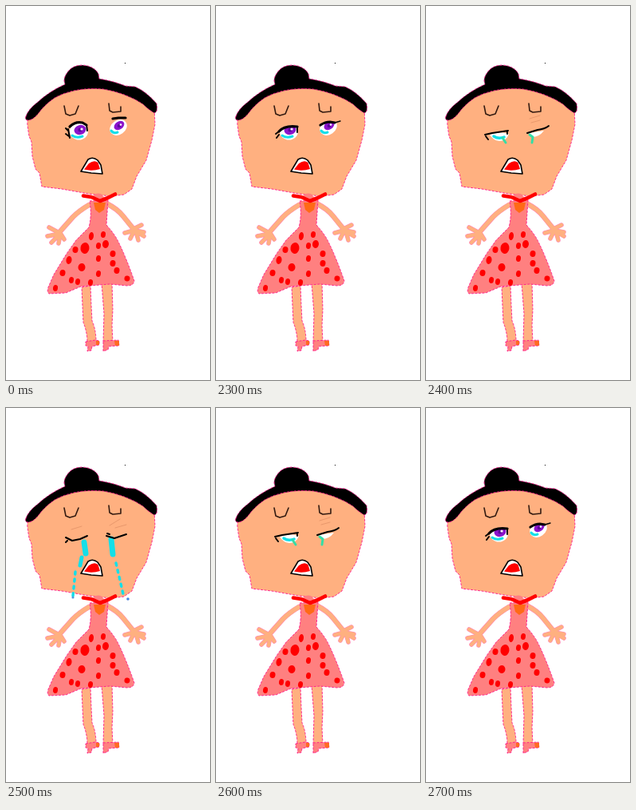
Write an HTML page that moves like this. It is 256 px wide and 468 px high and loops after 2.8 s.

```html
<!DOCTYPE html>
<html lang="en">
<head>
<meta charset="utf-8">
<title>Crying girl</title>
<style>
html, body { margin: 0; width: 100%; height: 100%; overflow: hidden; background: #fff; }
svg { display: block; width: 256px; height: 468px; }
.pose { display: none; }
svg[data-pose="open"] .open, svg[data-pose="half"] .half,
svg[data-pose="low"] .low, svg[data-pose="shut"] .shut { display: inline; }
.skin { fill: #ffb080; }
.dress { fill: #ff8080; }
.red { fill: #f00; }
.fringe { stroke: #ff1a8c; stroke-width: .9; stroke-dasharray: 3 1.5; }
.limb { fill: none; stroke: #ffb080; stroke-linecap: round; stroke-linejoin: round; }
.ink { fill: none; stroke: #000; stroke-width: 2; stroke-linecap: round; stroke-linejoin: round; }
.lash { stroke-width: 3.2; }
.brow { stroke: #321a10; stroke-width: 1.6; }
.tear { fill: none; stroke: #14dfe8; stroke-linecap: round; stroke-linejoin: round; }
.crease { fill: none; stroke: #e8986c; stroke-width: 1; stroke-linecap: round; }
</style>
</head>
<body>
<svg id="girl" viewBox="0 0 256 468" data-pose="open">
  <defs>
    <clipPath id="lidL"><path d="M74 162L79 156Q86 149 105 150V172H74z"/></clipPath>
    <clipPath id="lidR"><path d="M127 162L131 149Q137 145 143 145L155 146V170H127z"/></clipPath>
    <g id="eyeL">
      <ellipse cx="91.500" cy="157" rx="11.500" ry="10.500" fill="#fff"/>
      <ellipse cx="93" cy="155" rx="7.500" ry="6" fill="#8c14cc" transform="rotate(-15 93 155)"/>
      <circle cx="93" cy="155" r="2.500" fill="#5a0c9c"/>
      <circle cx="95" cy="154" r="1.600" fill="#fff"/>
      <path class="tear" stroke-width="3" d="M83 162Q89 166 96 163"/>
    </g>
    <g id="eyeR">
      <ellipse cx="141" cy="152" rx="11.500" ry="9" fill="#fff" transform="rotate(-35 141 152)"/>
      <ellipse cx="142" cy="149.500" rx="7" ry="5" fill="#8c14cc" transform="rotate(-35 142 149.500)"/>
      <circle cx="142" cy="150" r="2.200" fill="#5a0c9c"/>
      <circle cx="144" cy="148.500" r="1.300" fill="#fff"/>
      <path class="tear" stroke-width="3" d="M132 156Q135 160 140 158"/>
    </g>
  </defs>

  <!-- legs and shoes -->
  <path class="skin fringe" d="M95 352L106 350L107 375L108 394Q113 405 113 420L102 421Q102 408 97 396L96 375z"/>
  <path class="skin fringe" d="M120 347Q127 343 133 346L134 380L133 400L134 420H122L123 385z"/>
  <path class="dress fringe" d="M100 420L112 418L117 419V424L108 426L107 431L102 432L103 426L100 425z"/>
  <path class="dress fringe" d="M122 419L141 418L142 425L129 426L128 430L122 432z"/>
  <path d="M113 419H117V424H113zM136 419H142V425H137z" fill="#ff6a22"/>

  <!-- arms, with a thin rim behind -->
  <g id="arms"></g>

  <!-- dress -->
  <path class="dress fringe" d="M105 244L128 243L126 274Q137 286 142 297Q152 318 161 344Q160 350 152 350L130 348L94 351L75 359L54 360Q51 358 53 352L60 336L76 310L88 293L104 277Q108 262 105 244z"/>
  <g id="spots" class="red"></g>

  <!-- face and hair -->
  <path class="skin fringe" d="M30 138Q26 141 27 150L29 163L32 170L33 188L37 204L42 209L45 226L70 229L104 235L132 238L148 236L158 229L164 213L176 193L183 168L187 148L186 128L150 106L90 99L50 115z"/>
  <path class="fringe" d="M25 138Q28 129 40 120Q54 107 74 98Q71 91 77 83Q83 74 96 74Q111 75 116 85L117 91Q135 94 150 100L162 101Q176 107 189 122Q191 133 186 134Q179 130 172 123Q151 109 122 104Q86 101 61 115Q48 124 41 134Q34 143 27 143Q23 142 25 138z"/>
  <rect x="149" y="71" width="1" height="1"/>

  <!-- collar -->
  <path class="dress" d="M107 240Q112 233 119 235L125 241L118 246z"/>
  <path d="M110 246H125L123 255L117 259L112 255z" fill="#ff6a16"/>
  <path d="M97 237.500L107 239L118 244L128 240L137 235.500" fill="none" stroke="#f00" stroke-width="4.600" stroke-linecap="round" stroke-linejoin="round"/>

  <!-- brows and mouth -->
  <path class="ink brow" d="M73 125L75 135L80 137L87 135L91 125M129 122L130 131L134 133L144 132L144 126"/>
  <path class="ink" style="fill:#fff;stroke-width:1.600" d="M94 207L103 192Q109 188 115 193L119 199L121 210L107 209z"/>
  <path class="red" d="M98 204.500L104 197Q111 192 115.500 196L118 204Q108 207 98 204.500z"/>

  <g class="pose open">
    <use href="#eyeL"/><use href="#eyeR"/>
    <path class="ink lash" d="M80 151Q87 144 96 146L101 149"/>
    <path class="ink" d="M101 149L102 156M75 153L78 156M75 160L79 163M78 154L80 165"/>
    <path class="ink lash" d="M134 141L141 140L150 140"/>
  </g>

  <g class="pose half">
    <g clip-path="url(#lidL)"><use href="#eyeL"/></g>
    <g clip-path="url(#lidR)"><use href="#eyeR"/></g>
    <path class="ink lash" d="M79 157Q86 149 102 151"/>
    <path class="ink" d="M75 160L79 157M76 165L79 161M102 151L102 158"/>
    <path class="ink lash" d="M131 149Q137 145 143 145L149 146"/>
    <path class="ink" style="stroke-width:1.400" d="M149 146L156 144"/>
  </g>

  <g class="pose low">
    <path d="M80 161Q93 156 104 160Q101 169 92 169Q84 168 80 161z" fill="#fff"/>
    <path class="tear" stroke-width="3.500" d="M85 163Q91 167 98 164"/>
    <path d="M129 159L148 156Q142 164 133 164z" fill="#fff"/>
    <path class="tear" style="stroke:#35dda5" stroke-width="3" d="M96 165L100 171M130 161L134 164L133 171"/>
    <path class="ink" d="M74 161L83 159L103 156M75 163L78 167M102 157L102 160"/>
    <path class="ink" d="M127 159L140 155Q149 154 154 150"/>
    <path class="crease" d="M130 141L143 137M132 146L143 143"/>
  </g>

  <g class="pose shut">
    <path class="tear" stroke-width="7" d="M98 168L100 182M132 164L134 183"/>
    <path class="tear" stroke-width="5" d="M95 187L93 197"/>
    <path class="tear" stroke-width="3.500" stroke-dasharray="3 6" d="M87 205L84 235M138 194L148 237"/>
    <circle cx="153" cy="239" r="1.800" fill="#4b83df"/>
    <circle cx="84" cy="237" r="1.600" fill="#4b9fdf"/>
    <path class="ink" d="M75 162L83 166L93 164L102 160M77 166L75 168M126 160L136 163L151 158M130 158L127 157"/>
    <path class="crease" d="M130 147L143 139M82 152L95 148M137 150L151 146"/>
  </g>
</svg>
<script>
const girl = document.getElementById("girl");
const fill = (id, html) => { document.getElementById(id).innerHTML = html; };

const spots = [
  [107, 288, 3, 5], [122, 286, 3, 4], [99, 303, 5.5, 7], [87, 305, 3.5, 4],
  [116, 300, 3, 4], [125, 298, 4, 5], [79, 318, 3.5, 5], [95, 327, 4.5, 5],
  [116, 316, 3, 4], [134, 310, 3.5, 4], [134, 322, 3.5, 4], [71, 334, 3.5, 4],
  [116, 335, 3, 4], [139, 331, 3.5, 4], [82, 343, 3, 4], [90, 345, 3, 4],
  [106, 346, 3, 4], [62, 353, 3, 4], [152, 341, 3.5, 3.5]
];
fill("spots", spots.map(([x, y, rx, ry]) =>
  `<ellipse cx="${x}" cy="${y}" rx="${rx}" ry="${ry}" transform="rotate(8 ${x} ${y})"/>`).join(""));

const arms = "M104 249Q92 256 84 264L68 282M126 247Q140 254 147 263L160 279";
const fingers = "M67 284L54 277M67 285L52 288M67 286L57 296M68 286L66 297M68 284L73 292" +
  "M160 281L149 284M161 281L156 291M163 282L166 293M163 282L173 288M162 281L173 283M160 279L170 274";
const limbs = (extra, style) => `<g class="limb" style="${style}">` +
  `<path d="${arms}" stroke-width="${5.5 + extra}"/><path d="${fingers}" stroke-width="${4.5 + extra}"/></g>`;
fill("arms", limbs(1, "stroke:#ff85b8") + limbs(0, ""));

const LOOP = 2800;
const steps = [[0, "open"], [2300, "half"], [2400, "low"], [2500, "shut"], [2600, "low"], [2700, "half"]];
const start = performance.now();

function draw() {
  const t = (performance.now() - start) % LOOP;
  const pose = steps.filter(([at]) => at <= t).pop()[1];
  if (girl.dataset.pose !== pose) girl.dataset.pose = pose;
  requestAnimationFrame(draw);
}
draw();
</script>
</body>
</html>
```
